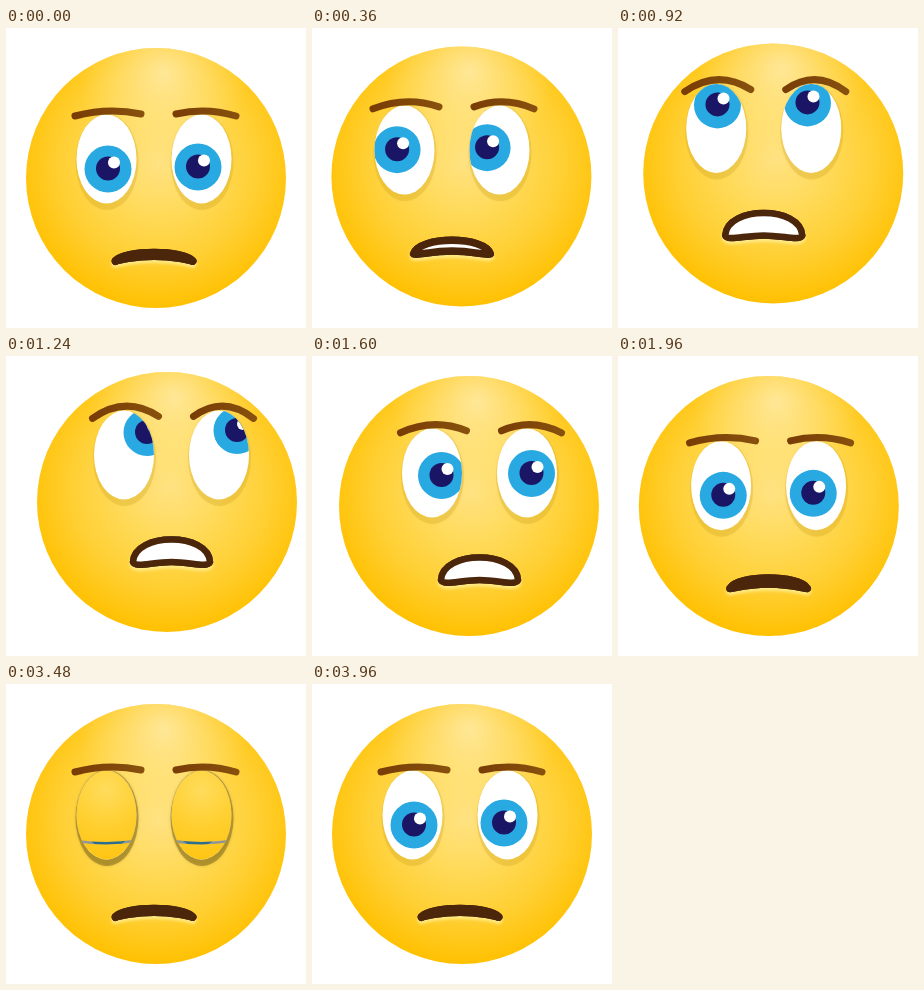
An HTML page with a canvas for the animation above (4.16 s loop, 300 by 300 pixels).

```html
<!DOCTYPE html>
<html lang="en">
<head>
<meta charset="utf-8">
<title>Eye roll</title>
<style>
html, body { margin: 0; width: 100%; height: 100%; overflow: hidden; background: #fff; }
canvas { display: block; }
</style>
</head>
<body>
<canvas id="stage" width="300" height="300"></canvas>
<script>
const ctx = document.getElementById('stage').getContext('2d');
const LOOP = 4160, STEP = 40;

// Each key: how far head and face have moved, iris position within the eye, mouth opening
const pose = (at, headX, headY, faceX, faceY, gazeX, gazeY, open) =>
  ({ at, headX, headY, faceX, faceY, gazeX, gazeY, open });
const keys = [
  pose(120, 0, 0, 0, 0, -1, 9, 0),
  pose(640, 0, -4, -16, -24, -18.5, -18.5, 1),
  pose(1240, 11, -4, 17.5, -32, 20.5, -23.5, 1),
  pose(1600, 7, 0, 19.5, -14, 7, 1.5, 1),
  pose(2080, 0, 0, 0, 0, -1, 9, 0),
];

const lerp = (a, b, u) => a + (b - a) * u;
const clamp = u => Math.min(1, Math.max(0, u));
const span = (t, a, b) => clamp((t - a) / (b - a));
const smooth = u => u * u * (3 - 2 * u);

function slope(k, name) {
  const before = keys[k - 1], after = keys[k + 1];
  return before && after ? (after[name] - before[name]) / (after.at - before.at) : 0;
}

// Smooth curve through the keys
function poseAt(t) {
  const k = keys.findIndex(key => key.at > t) - 1;
  if (k < 0) return keys[0];
  const a = keys[k], b = keys[k + 1], d = b.at - a.at;
  const u = (t - a.at) / d, w = 1 - u, result = {};
  for (const name in a) {
    result[name] = lerp(a[name], b[name], smooth(u)) +
      d * u * w * (w * slope(k, name) - u * slope(k + 1, name));
  }
  return result;
}

// Lid edges, measured from the centre of the eye
function lidsAt(t) {
  const droop = 1 - (1 - span(t, 2000, 2480)) ** 2;
  const open = smooth(span(t, 3560, 3960));
  const close = smooth(span(t, 3200, 3520));
  return {
    upper: lerp(lerp(lerp(-56, -9, droop), 25.5, close), -56, open),
    lower: lerp(50, 25.5, close * (1 - open)),
    visible: droop > 0 && open < 1,
    shut: close * (1 - open),
  };
}

function disc(x, y, r, fill) {
  ctx.beginPath();
  ctx.arc(x, y, r, 0, 7);
  ctx.fillStyle = fill;
  ctx.fill();
}

function oval(x, y, rx, ry) {
  ctx.beginPath();
  ctx.ellipse(x, y, rx, ry, 0, 0, 7);
}

function stroke(color, width) {
  ctx.strokeStyle = color;
  ctx.lineWidth = width;
  ctx.stroke();
}

function radial(x, y, r, ...colors) {
  const g = ctx.createRadialGradient(x, y, 0, x, y, r);
  colors.forEach((color, i) => g.addColorStop(i / (colors.length - 1), color));
  return g;
}

function head(x, y) {
  disc(x, y, 130, radial(x + 3, y - 15, 146, '#ffe282', '#ffdb5c', '#ffd035', '#ffc000'));
  disc(x, y, 130, radial(x + 8, y - 105, 85, 'rgba(255,240,190,.7)', 'rgba(255,235,160,0)'));
}

function eye(x, y, irisX, irisY, tilt, lids) {
  ctx.save();
  oval(x + .5, y + 3, 31.5, 48);
  ctx.shadowBlur = 3;
  ctx.shadowColor = ctx.fillStyle = `rgba(${lerp(205, 140, lids.shut)},${lerp(160, 115, lids.shut)},30,${lerp(.28, .6, lids.shut)})`;
  ctx.fill();
  ctx.shadowBlur = 0;
  ctx.shadowColor = 'transparent';

  oval(x, y, 30, 44.5);
  ctx.fillStyle = '#fff';
  ctx.fill();
  ctx.clip();
  disc(irisX, irisY, 23.5, '#29a9e1');
  disc(irisX, irisY - .5, 12, '#1b1565');
  disc(irisX + 6, irisY - 6.5, 6, '#fff');
  if (lids.visible) {
    const skin = radial(x, y - 25, 75, '#ffdc5c', '#ffcf2e', '#ffc30f');
    const lean = tilt * (1 - lids.shut), sag = 6 * lids.shut;
    const flap = (edge, far, fill) => {
      ctx.beginPath();
      ctx.moveTo(x - 34, edge + lean);
      ctx.quadraticCurveTo(x, edge + sag, x + 34, edge - lean);
      ctx.lineTo(x + 34, far);
      ctx.lineTo(x - 34, far);
      ctx.fillStyle = fill;
      ctx.fill();
    };
    flap(y + lids.upper + 8, y - 60, 'rgba(50,62,75,.55)');
    flap(y + lids.upper, y - 60, skin);
    flap(y + lids.lower, y + 60, skin);
  }
  ctx.restore();
}

function brow(x, y, half, tilt, arch) {
  ctx.beginPath();
  ctx.moveTo(x - half, y + tilt);
  ctx.quadraticCurveTo(x, y - arch, x + half, y - tilt);
  const g = ctx.createLinearGradient(x - half, 0, x + half, 0);
  g.addColorStop(0, '#793d06');
  g.addColorStop(1, '#87500d');
  stroke(g, 7);
}

function mouth(x, y, open) {
  const mix = (a, b) => lerp(a, b, open);
  const corner = mix(5, 10), top = mix(-6, -20), base = mix(0, 10), dip = mix(4, 16);
  ctx.save();
  ctx.translate(x, y);
  ctx.beginPath();
  ctx.moveTo(-38.5, corner);
  ctx.bezierCurveTo(-mix(30, 37), top, mix(30, 37), top, 38.5, corner);
  ctx.bezierCurveTo(36, dip, 20, base, 0, base);
  ctx.bezierCurveTo(-20, base, -36, dip, -38.5, corner);
  ctx.closePath();
  ctx.fillStyle = '#fff';
  ctx.shadowColor = 'rgba(255,240,150,.8)';
  ctx.shadowBlur = 3;
  ctx.shadowOffsetY = 3;
  stroke('#4b260b', mix(8, 6.5));
  ctx.shadowColor = 'transparent';
  ctx.fill();
  stroke('#4b260b', mix(8, 6.5));
  ctx.restore();
}

function draw(t) {
  const p = poseAt(t), lids = lidsAt(t);
  const x = 148 + p.faceX, y = 131 + p.faceY;
  ctx.clearRect(0, 0, 300, 300);
  ctx.lineCap = ctx.lineJoin = 'round';
  head(150 + p.headX, 150 + p.headY);
  for (const side of [-1, 1]) {
    const eyeX = x + side * 47.5;
    eye(eyeX, y, eyeX + p.gazeX - side * 2.5, y + p.gazeY - side, side < 0 ? 2.5 : .5, lids);
    brow(x + 3 + side * 49, 87 + p.faceY * .8, 31.5 - side * 1.5, -side, 8 - p.faceY * .45);
  }
  mouth(x, 228 + p.faceY, clamp(p.open));
}

const start = performance.now();
function tick() {
  const t = (performance.now() - start) % LOOP;
  draw(Math.floor(t / STEP) * STEP);
  requestAnimationFrame(tick);
}
tick();
</script>
</body>
</html>
```
